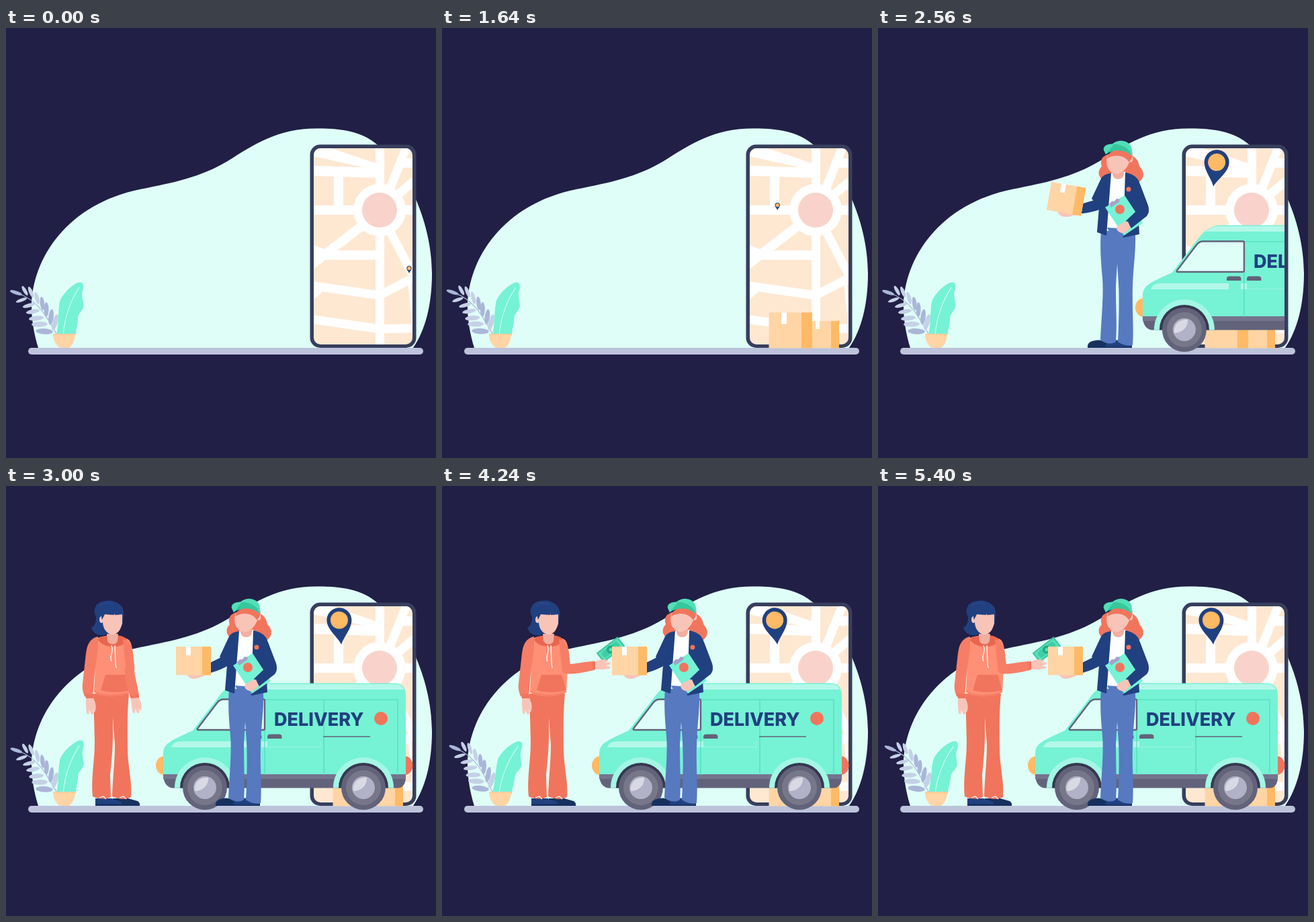
An HTML page with a canvas for the animation above (5440 ms loop, 640 by 640 pixels).

```html
<!DOCTYPE html>
<html lang="en">
<head>
<meta charset="utf-8">
<title>Delivery</title>
<style>
html, body { margin: 0; width: 100%; height: 100%; overflow: hidden; background: #211f45; }
canvas { display: block; width: 640px; height: 640px; }
</style>
</head>
<body>
<canvas id="stage" width="640" height="640"></canvas>
<script>
const ctx = document.getElementById('stage').getContext('2d');
const LOOP = 5440;
const C = {
  night: '#211f45', ice: '#dffef8', floor: '#bcc3db', frame: '#373e5c',
  map: '#fee8d2', rose: '#f9d3cb', navy: '#21407f', deep: '#17315f',
  amber: '#ffba66', peach: '#ffd5a5', mint: '#76f2d5', pale: '#a3f7e4',
  shine: '#b3f8e9', line: '#4fdcbc', green: '#36c79d', coral: '#f1755c',
  sleeve: '#f67e67', salmon: '#ff8f75', collar: '#e8664f',
  skin: '#f9c4b8', jeans: '#5679c0', steel: '#62637a', white: '#fff'
};

const clamp = v => Math.max(0, Math.min(1, v));
const span = (t, a, b) => clamp((t - a) / (b - a));
const sine = v => (1 - Math.cos(Math.PI * v)) / 2;
const quad = v => v < .5 ? 2 * v * v : 1 - 2 * (1 - v) * (1 - v);
const out = v => 1 - Math.pow(1 - v, 3);

function fill(d, color) {
  ctx.fillStyle = color;
  ctx.fill(new Path2D(d));
}
function stroke(d, color, width) {
  ctx.strokeStyle = color;
  ctx.lineWidth = width;
  ctx.stroke(new Path2D(d));
}
function rect(x, y, w, h, color, r = 0) {
  ctx.fillStyle = color;
  ctx.beginPath();
  ctx.roundRect(x, y, w, h, r);
  ctx.fill();
}
function oval(x, y, rx, ry, color, turn = 0) {
  ctx.fillStyle = color;
  ctx.beginPath();
  ctx.ellipse(x, y, rx, ry, turn, 0, Math.PI * 2);
  ctx.fill();
}
function group(draw, { x = 0, y = 0, turn = 0, sx = 1, sy = sx }) {
  ctx.save();
  ctx.translate(x, y);
  ctx.rotate(turn);
  ctx.scale(sx, sy);
  draw();
  ctx.restore();
}
function about(x, y, turn, draw) {
  group(() => { ctx.translate(-x, -y); draw(); }, { x, y, turn });
}
function clipped(x, y, w, h, draw, r = 0) {
  ctx.save();
  ctx.beginPath();
  ctx.roundRect(x, y, w, h, r);
  ctx.clip();
  draw();
  ctx.restore();
}

// Backdrop

function backdrop() {
  rect(0, 0, 640, 640, C.night);
  fill('M48 476C42 457 38 434 38 414C39 343 91 262 200 240C250 230 290 222 330 198C370 173 405 149 465 149.5C500 149.5 530 154 553 174C592 203 634 285 634 365C634 412 624 450 606 476Z', C.ice);
}

function roads() {
  rect(458, 179, 147, 292, C.map);
  fill('M458 179H484L550 201V209L530 207L458 191Z', C.white);
  fill('M458 205L550 208V223L458 220Z', C.white);
  rect(550, 179, 13, 292, C.white);
  rect(488, 220, 14, 45, C.white);
  rect(458, 264, 147, 14, C.white);
  rect(470, 331, 84, 14, C.white);
  rect(588, 194, 18, 14, C.white);
  stroke('M571 240L597 175', C.white, 13);
  stroke('M580 251L608 227', C.white, 13);
  stroke('M570 300L606 368', C.white, 13);
  stroke('M533 292L454 353', C.white, 14);
  fill('M458 323L480 332L470 346L458 357Z', C.white);
  stroke('M458 384L556 398L606 372', C.white, 13);
  fill('M458 388L471 393L458 404Z', C.white);
  stroke('M458 434L556 448L606 447', C.white, 13);
  stroke('M600 374L606 444', C.white, 4);
  oval(556, 271, 39, 39, C.white);
  oval(556, 271, 26, 26, C.rose);
}

function phone() {
  rect(452.5, 173.5, 158, 302.5, C.frame, 15);
  clipped(458, 179, 147, 292, roads, 10);
}

function parcel(x, y, w, h, side, tapeX, tapeW, tapeH) {
  rect(x, y, w, h, C.peach);
  rect(x + w - side, y, side, h, C.amber);
  rect(tapeX, y, tapeW, tapeH, C.white);
}

function boxes(t) {
  const first = quad(span(t, 500, 1000));
  const second = quad(span(t, 800, 1300));
  clipped(440, 380, 180, 96.5, () => {
    if (second) parcel(551, 477 - 41 * second, 40, 42, 12, 556, 6, 12);
    if (first) parcel(486.5, 477 - 53.5 * first, 64.5, 54, 16, 505, 8, 17);
  });
}

// Follows the road, then the roundabout, then the road to the left.
function route(d) {
  const line = 72, r = 33, arc = r * Math.PI * 4 / 3;
  if (d < line) return [600 - 27.5 * d / line, 365 - 65.5 * d / line];
  if (d < line + arc) {
    const a = Math.PI / 3 - (d - line) / r;
    return [556 + r * Math.cos(a), 271 + r * Math.sin(a)];
  }
  return [523 - (d - line - arc), 271];
}

function pin(t) {
  const trip = sine(span(t, 0, 1320));
  const [x, y] = route(trip * 234);
  const grow = out(span(t, 1720, 2300));
  const swing = -.135 * Math.cos((t - 3160) / 1200 * Math.PI * 2) * grow;
  group(() => {
    fill('M0 0C-4 -11 -18.5 -23 -18.5 -36.5A18.5 18.5 0 0 1 18.5 -36.5C18.5 -23 4 -11 0 0Z', C.navy);
    oval(0, -36.5, 13, 13, C.amber);
  }, { x, y: y - 35 * grow, turn: swing, sx: .2 + .8 * grow });
}

// Plants

const swayKeys = [[0, 0], [680, .037], [1120, .005], [1640, .012], [2050, .035],
  [2400, -.015], [2650, .012], [3000, .008], [3220, -.04], [3500, .01],
  [4240, .07], [4750, .035], [5400, .058], [5440, .058]];

function sway(t) {
  const i = Math.max(1, swayKeys.findIndex(k => k[0] >= t));
  const [a, from] = swayKeys[i - 1], [b, to] = swayKeys[i];
  return from + (to - from) * sine(span(t, a, b));
}

function plants(t) {
  const turn = sway(t);
  about(74, 454, turn, () => {
    const light = '#c5d1e6', dark = '#aab6d8';
    stroke('M76 457C62 432 48 405 18 395', dark, 1.2);
    oval(15, 394, 9.5, 2.7, dark, .32);
    [[23, 405], [34, 413], [40, 422], [45, 432], [50, 441], [57, 451.5]].forEach(([x, y], i) =>
      oval(x, y, 8.7 + i * .8, 2.5 + i * .35, i > 4 ? dark : light, -.35 + i * .08));
    [[28, 391], [37, 393], [46, 402], [54, 410], [60, 419], [67, 430], [73, 438]].forEach(([x, y], i) =>
      oval(x, y, 8 + i * .7, 2.6 + i * .22, i > 2 && i < 6 ? dark : light, 1.05 + i * .13));
  });
  about(86, 456, turn * .9, () => {
    fill('M75 457C79 440 77 422 80 407C83 398 95 384 107 379C113 377 116 380 115 388C111 397 115 405 115.5 413C115 421 108 423 107 431C107 441 104 447 104 457Z', C.mint);
    stroke('M85 457C87 435 93 410 109 386', '#c8fff2', 1.2);
  });
  fill('M70 455H103C103 466 98 473 94 476H80C74 472 70 465 70 455Z', C.peach);
  rect(70, 455, 33, 2, '#ffcf9b');
}

// Van

function wheel(x) {
  const y = 449;
  clipped(x - 50, 390, 100, 59.5, () => {
    oval(x, y, 45, 45, C.pale);
    oval(x, y, 37, 37, '#363850');
  });
  oval(x, y, 33, 33, C.steel);
  oval(x, y, 26, 26, '#777789');
  oval(x, y, 17, 17, '#b1b1c7');
  fill(`M${x - 15} 454C${x - 17} 443 ${x - 9} 433 ${x + 5} 434C${x + 6} 444 ${x - 2} 454 ${x - 15} 454Z`, '#d9d9e4');
}

function van() {
  oval(236, 416, 13, 14, C.amber);
  oval(593, 416, 12.5, 14, C.coral);
  fill('M234 430V398C235 383 243 380 278 364L314 317C324 303 334 294 350 293.5H580C590 294 594 300 595 310V430Z', C.mint);
  fill('M327 303C334 297 341 295 350 295H580C587 295 590 298 592 303Z', C.shine);
  fill('M234 429H595C596 440 592 449 584 449.5H247C239 448 234 441 234 429Z', C.steel);
  rect(234, 429, 361, 7, '#74758d');
  fill('M246 389C248 382 254 380 262 380H362V389Z', C.shine);
  rect(380, 380, 9, 9, C.shine);
  stroke('M389 388.5H468V380', C.pale, .8);
  stroke('M385 317V430M385 318H583V430M473 318V430', C.line, 1.2);
  stroke('M472 373H542', C.steel, 1.5);
  const glass = 'M285 361L314 323C317 319 320 317.5 324 317.5H383Q385 317.5 385 319.5V361Q385 363 383 363H286Q284 363 285 361Z';
  fill(glass, C.ice);
  stroke(glass, C.steel, 2.4);
  for (const x of [359, 389]) rect(x, 369.5, 21.5, 6.5, C.steel, [4, 4, 1, 1]);
  ctx.fillStyle = C.navy;
  ctx.font = '800 27px Inter, "Open Sans", sans-serif';
  ctx.fillText('DELIVERY', 399, 356.5);
  oval(558, 346, 10, 10, C.coral);
  wheel(296);
  wheel(532);
}

// Courier

function offerArm(turn) {
  about(313, 264, turn, () => {
    fill('M268 280C276 278 282 281 290 278L302 274L303 280C294 281 289 287 279 287C272 286 272 283 268 280Z', C.skin);
    fill('M327 250C320 256 311 259 300 265L290 277L295 280C308 278 321 273 331 267Z', C.navy);
    parcel(253, 239, 52, 42.5, 13, 268, 7, 13);
  });
}

function courier(t) {
  fill('M312 476C311 468 317 465 329 464.5L342 467V476Z', C.deep);
  fill('M338 476C338 468 346 465 356 464.5L378 470V476Z', C.navy);
  rect(312, 474.5, 66, 1.5, C.deep);
  fill('M332 302H356L357 334L354 384C354 420 356 447 354 467C346 472 337 469 331 464C333 425 336 395 334 372C332 350 330 325 332 302Z', C.jeans);
  fill('M340 295H368L383 307C384 330 380 355 379 382C378 420 381 448 379 472C371 474 363 471 357 467C359 430 359 400 358 380L354 322Z', C.jeans);

  fill('M342 188C331 192 331 199 333 206C326 213 328 221 334 226C344 229 352 226 354 219L370 219C374 228 383 231 389 229C397 223 396 214 391 208C387 205 390 196 378 190Z', C.coral);
  fill('M341 297L346 216L369 214L371 299Z', C.white);
  rect(349, 207, 17, 18, '#f2aea0', 8);
  fill('M341 191C338 206 344 216 355 217C367 216 376 202 375 191C370 181 349 179 341 191Z', C.skin);
  oval(376, 195, 3.5, 5, C.skin);
  fill('M341 194C344 181 359 178 371 182L379 187C378 193 376 199 373 199C369 191 354 186 341 194Z', C.coral);
  fill('M345 181C346 172 355 167 364 168C375 169 380 178 378 191C370 181 357 181 345 181Z', '#52dfb8');
  fill('M336 182C334 175 343 171 354 173C366 174 374 180 378 190C367 181 352 179 339 188Z', C.green);
  fill('M336 181C336 175 344 172 351 173C347 178 343 183 339 188Z', '#52dfb8');

  fill('M347 216C340 217 335 219 332 224L318 254L329 267L326 304L340 309Z', C.navy);
  fill('M368 215C378 217 386 221 389 230L402 264C404 270 402 276 399 279L388 288L389 307L365 312Z', C.navy);
  oval(373, 240, 3.5, 3.5, C.coral);
  fill('M338 267L367 249L394 290L366 309Z', C.mint);
  fill('M344 262L348 258L352 258L355 254L360 255L359 259L347 267Z', '#a4a3c8');
  oval(360, 270, 7, 7, C.coral);
  fill('M381 239L388 269L369 287L377 298L400 280C405 273 403 269 400 260L390 233Z', C.navy);
  fill('M372 288C364 289 360 292 355 297C355 303 361 306 368 305L376 297Z', C.skin);
  offerArm(.18 * (1 - sine(span(t, 2520, 2920))));
}

// Customer

function hand() {
  fill('M-5 -1L6 -1C10 6 11 14 8 20L5 15L6 22L3 23L0 16L-1 23L-4 21L-5 10Z', C.skin);
}

function money() {
  group(() => {
    rect(-20, -9, 40, 18, C.green);
    rect(-18, -7, 36, 14, '#59e0b9');
    rect(-15, -5, 30, 10, '#3fcea5', 4);
    oval(0, 0, 6, 6, '#23ad85');
    oval(0, 0, 2.5, 2.5, '#59e0b9');
  }, { x: 251, y: 243.5, turn: -.66 });
}

function customer(t) {
  fill('M159 476V465H182L196 469Q200 472 199 476Z', C.deep);
  fill('M133 476V465H157L171 470Q173 473 173 476Z', C.navy);
  rect(133, 473.5, 40, 2.5, C.deep);
  fill('M130 309H160L159 350C160 385 157 410 155 430L156 463C147 467 137 466 129 462C126 438 132 410 132 380Z', C.coral);
  fill('M155 309H183C180 340 181 365 181 390C181 418 188 439 186 463C177 468 167 466 158 462C159 432 162 410 162 385L158 331Z', C.coral);
  stroke('M139 464L145 462L149 466M169 464L175 462L179 466', C.white, 1.2);

  group(hand, { x: 124, y: 317 });
  fill('M133 228C145 221 171 221 183 229C190 237 189 257 187 270L185 307C173 314 143 315 131 307L133 260Z', C.salmon);
  fill('M137 224C125 227 121 235 119 249L114 294C113 302 115 308 117 313L129 314L132 278L137 242Z', C.sleeve);
  fill('M117 309L130 310V316L119 316Z', C.coral);
  stroke('M131 306C145 313 172 313 185 306', C.coral, 1);
  fill('M148 281H178L185 304C172 308 153 308 141 304Z', C.coral);

  fill('M137 229C143 220 175 219 180 229C176 242 146 243 137 229Z', C.collar);
  fill('M150 220H167L166 231C163 237 155 237 151 231Z', '#f2aea0');
  stroke('M157 237C161 250 153 251 157 261M162 237C163 249 162 258 164 271', C.white, 1.3);
  fill('M134 194C128 184 134 172 148 171C158 169 166 173 171 178C177 184 176 194 173 206L146 222C137 223 130 220 127 211C132 208 134 203 134 194Z', C.navy);
  fill('M144 190H173V205C170 215 166 221 158 221C149 220 144 211 144 202Z', C.skin);
  oval(142, 199, 3, 5, C.skin);
  fill('M143 199C139 185 148 176 160 177C171 177 175 184 175 191L162 192L160 187L161 192L147 191Z', C.navy);
  stroke('M140 179C146 173 153 173 160 177', '#315299', 1);

  const raise = sine(span(t, 3160, 3760));
  const bill = out(span(t, 3560, 3800));
  if (bill) group(() => { ctx.translate(-239, -264); money(); }, { x: 239, y: 264, sx: bill });
  about(184, 272, (1 - raise) * 1.5, () => {
    group(hand, { x: 228, y: 268, turn: -Math.PI / 2 });
    fill('M182 265C195 266 207 262 224 261L227 274C212 277 202 280 187 279.5C178 279 176 269 182 265Z', C.sleeve);
    fill('M223 261L228 261V273L225 274Z', C.coral);
  });
  fill('M174 228C184 229 187 238 189 248L191.5 272C190 281 180 281 179 275Z', C.sleeve);
}

function rising(t, x, a, b, draw) {
  const s = out(span(t, a, b));
  if (s) group(() => { ctx.translate(-x, -476); draw(t); }, { x, y: 476, sx: s });
}

function draw(t) {
  backdrop();
  phone();
  rect(33, 476, 588, 10, C.floor, 5);
  boxes(t);
  pin(t);
  plants(t);
  const drive = 382 * (1 - sine(span(t, 2020, 3000)));
  if (t > 2020) clipped(0, 0, drive > 1 ? 605 : 640, 640, () => group(van, { x: drive }));
  rising(t, 158, 2600, 2960, customer);
  rising(t, 350, 1960, 2440, courier);
}

const start = performance.now();
function tick(now) {
  draw(Math.max(0, now - start) % LOOP);
  requestAnimationFrame(tick);
}
draw(0);
requestAnimationFrame(tick);
</script>
</body>
</html>
```
